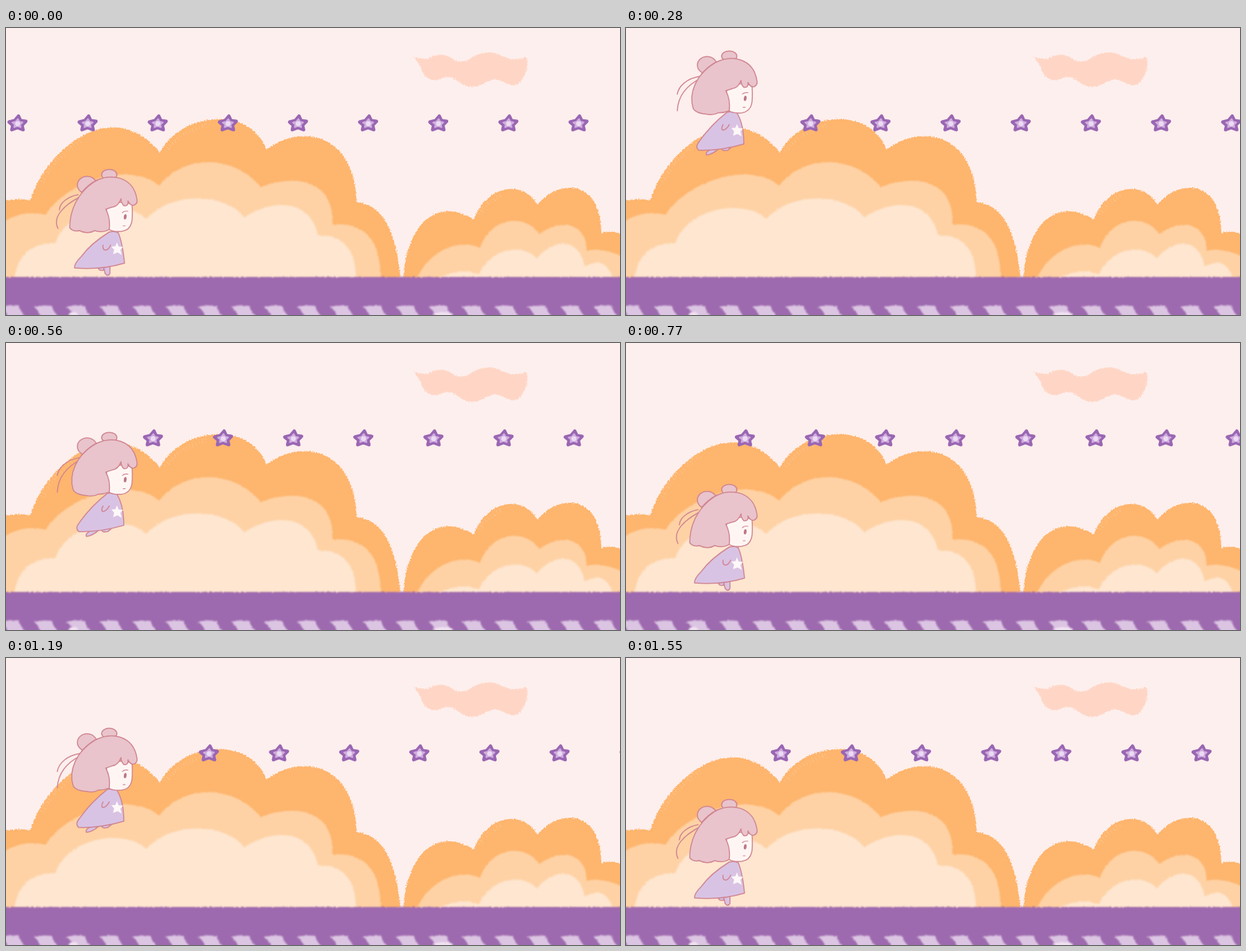
Write an HTML page that moves like this. It is 886 px wide and 415 px high and loops after 1620 ms.

```html
<!DOCTYPE html>
<html lang="en">
<head>
<meta charset="utf-8">
<title>Star jump</title>
<style>
html, body { margin: 0; width: 100%; height: 100%; overflow: hidden; background: #fdefed; }
svg { display: block; width: 100%; height: 100%; }
</style>
</head>
<body>
<svg viewBox="0 0 886 415" xmlns="http://www.w3.org/2000/svg">
  <defs>
    <filter id="chalk" x="-20" y="0" width="926" height="430" filterUnits="userSpaceOnUse" color-interpolation-filters="sRGB">
      <feTurbulence type="fractalNoise" baseFrequency=".5" numOctaves="2" seed="4"/>
      <feDisplacementMap in="SourceGraphic" scale="5" xChannelSelector="R" yChannelSelector="G"/>
      <feGaussianBlur stdDeviation=".5"/>
    </filter>
    <filter id="soft" x="-20" y="0" width="926" height="430" filterUnits="userSpaceOnUse" color-interpolation-filters="sRGB">
      <feTurbulence type="fractalNoise" baseFrequency=".3" numOctaves="2" seed="9"/>
      <feDisplacementMap in="SourceGraphic" scale="3" xChannelSelector="R" yChannelSelector="G"/>
      <feGaussianBlur stdDeviation=".9"/>
    </filter>
    <g id="star" stroke-linejoin="round">
      <path id="spike" d="M1.500 -10 L4.500 -3.500 L12 -2.500 L6.500 3 L8 9.500 L0 6.500 L-8 9.500 L-6.500 3 L-12 -1.500 L-4 -3.500Z" fill="#9a66b3" stroke="#9a66b3" stroke-width="5"/>
      <path d="M.7 -6 L3 -2 L7.500 -1 L4 2.200 L4.800 6 L0 4.200 L-4.800 6 L-4 2 L-7.500 -.8 L-2.600 -2Z" fill="#cfaede" stroke="#cfaede" stroke-width="2"/>
      <circle cx=".3" cy=".8" r="3.600" fill="#ecdaf3"/>
    </g>
  </defs>
  <rect width="886" height="415" fill="#fdefed"/>
  <path filter="url(#chalk)" fill="#ffd6c6" d="M587 41 Q602 47 612 43 Q630 33 645 45 Q658 54 673 42 Q697 29 717 41 Q733 49 751 42 Q756 56 745 74 Q736 88 722 80 Q706 70 693 78 Q672 92 655 79 Q640 66 627 74 Q611 79 602 66 Q597 50 587 41Z"/>
  <g filter="url(#chalk)" fill="#feb56d">
    <path d="M-9 251 Q18 245 35 249 C60 172 155 97 222 180 C252 122 352 111 376 176 C420 140 504 148 506 252 C548 255 565 305 569 362 H-9Z"/>
    <path d="M573 362 C581 270 630 248 675 277 C692 230 743 217 767 255 C798 218 858 218 859 296 Q880 291 895 303 V362Z"/>
    <g fill="none" stroke="#ffca96" stroke-width="7" stroke-dasharray="1 4" opacity=".55">
      <path d="M52 222 Q72 186 108 163"/>
      <path d="M230 178 Q252 150 290 140"/>
      <path d="M684 270 Q695 250 716 241"/>
    </g>
  </g>
  <g filter="url(#soft)" fill="#fed2a5">
    <path d="M-9 284 Q20 262 57 270 C85 225 175 190 221 228 C260 180 330 185 368 230 C412 212 474 216 471 284 C515 282 539 300 541 362 H-9Z"/>
    <path d="M593 362 C612 320 655 304 684 318 C700 272 750 268 770 298 C800 274 838 282 838 322 Q862 316 895 333 V362Z"/>
    <g fill="#fee6d0">
      <path d="M12 362 C18 325 40 310 71 311 C90 259 170 246 203 276 C235 238 315 236 344 274 C385 246 440 248 450 300 C485 298 505 320 505 362Z"/>
      <path d="M624 362 Q655 345 682 356 C704 315 745 312 766 333 C793 302 828 305 835 345 Q865 328 876 362Z"/>
    </g>
  </g>
  <g filter="url(#soft)">
    <rect x="-15" y="360" width="916" height="70" fill="#9e6aaf"/>
    <g id="stripes" fill="#dcc5e3"></g>
  </g>
  <g id="stars"></g>
  <g id="girl" fill="none" stroke="#d08591" stroke-width="1.500" stroke-linecap="round" stroke-linejoin="round"></g>
</svg>
<script>
const $ = id => document.getElementById(id);
const LOOP = 1620, STEP = 70, LAST = 22;

let stripes = '';
for (let x = -8; x < 890; x += 47.5)
  stripes += `<path d="M${x} 403 Q${x + 14} 400 ${x + 27} 402 Q${x + 28} 410 ${x + 37} 418 H${x + 11} Q${x + 8} 408 ${x} 403Z"/>`;
$('stripes').innerHTML = stripes +
  '<g fill="#f2e3f3"><ellipse cx="97" cy="414" rx="7" ry="3"/><ellipse cx="630" cy="414" rx="15" ry="3"/></g>';

const hair = '#e9c4cc', lilac = '#d9c3e4';
const poses = {
  stand: {
    bun: 227, left: 'Q140 297 128 293 Q118 299 106 293 Q97 295 92 289 C92 262 104 238 128 222',
    tails: 'M104 241 C88 244 77 254 77 263 M107 244 C86 255 66 272 75 290',
    dress: 'M149 295 Q156 293 162 296 Q168 310 171 340 Q138 350 99 347 Q98 341 109 330 Q122 312 149 295Z',
    arm: 'M140 314 Q139 322 145 321 Q149 319 151 314',
    feet: 'M133 347 Q135 352 141 350 L141 346Z M141 346 L143 355 Q147 360 150 355 L150 345Z'
  },
  leap: {
    bun: 225, left: 'Q141 294 133 294 Q126 298 117 296 Q101 295 97 288 C90 266 101 238 128 222',
    tails: 'M107 241 C88 244 76 255 74 267 M108 244 C88 254 75 270 74 291',
    dress: 'M146 293 Q154 291 160 294 Q170 310 170 339 Q136 349 105 348 Q99 343 106 335 Q122 312 146 293Z',
    arm: 'M140 311 Q136 319 141 319 Q146 317 149 311',
    feet: 'M120 348 Q114 352 116 355 Q125 354 134 346Z M138 346 Q139 350 147 348 L153 343Z'
  },
  float: {
    bun: 225, left: 'Q142 297 134 292 Q127 298 119 292 Q111 296 105 290 Q96 290 99 281 Q94 274 97 264 C100 246 108 235 128 222',
    tails: 'M113 238 C95 240 80 252 75 266 M116 236 C98 249 73 266 76 282',
    dress: 'M142 296 Q152 292 161 296 Q169 312 172 335 Q138 348 106 341 Q111 309 142 296Z',
    arm: 'M147 307 Q135 309 135 316 Q141 317 146 311',
    feet: 'M117 345 Q117 353 123 352 L132 347Z M143 345 Q151 348 154 355 Q160 359 159 353 L155 342Z'
  }
};

const draw = (name, p) => `<g id="${name}">
  <path d="${p.tails}"/>
  <path d="${p.feet}" fill="${lilac}"/>
  <path d="${p.dress}" fill="${lilac}"/>
  <path d="${p.arm}"/>
  <path d="M160 310 l2.500 6 6.500 .5 -4 4.500 2 7 -6 -3.500 -6.500 2.500 1.500 -6.500 -4 -4.500 6 -.5Z" fill="#fff8f8" stroke="none"/>
  <path d="M145 262 Q165 245 182 256 C183 275 184 292 167 294 Q154 295 148 291Z" fill="#fff6f4"/>
  <ellipse cx="117" cy="${p.bun}" rx="14" ry="12.500" fill="${hair}"/>
  <ellipse cx="149" cy="212" rx="11" ry="7.500" fill="${hair}"/>
  <path d="M149 291 ${p.left} C150 209 184 214 189 248 Q190 254 185 256 Q180 258 176 250 Q177 258 170 257 Q166 253 166 247 Q162 258 153 259 L144 262 Q151 275 149 291Z" fill="${hair}"/>
  <path d="M109 238 Q119 226 131 220"/>
  <ellipse cx="172" cy="273" rx="2" ry="3.800" transform="rotate(8 172 273)" fill="#bd7788" stroke="none"/>
  <path d="M168 267 Q171 264 176 265 M169 286 h3" stroke-width="1.200"/>
</g>`;
$('girl').innerHTML = Object.entries(poses).map(([k, p]) => draw(k, p)).join('');

// Step at which each collected star vanishes
const taken = { 1: 3, 2: 3, 3: 12, 4: 17 };
const COUNT = 13;
$('stars').innerHTML = '<use href="#star"/>'.repeat(COUNT);
const stars = [...$('stars').children];

// Times in steps
const jumps = [{ start: 1.44, peak: 5 }, { start: 11, peak: 14.4 }];
const HEIGHT = 186, FALL = 3.89;

function jumpAt(s) {
  for (const { start, peak } of jumps) {
    const d = s - peak;
    if (s <= start || d >= FALL) continue;
    const u = d < 0 ? d / (peak - start) : d / FALL;
    return { y: HEIGHT * (1 - u * u), pose: d > -0.1 && d < 1.4 ? 'float' : 'leap' };
  }
  return { y: 0, pose: 'stand' };
}

function render(ms) {
  const t = ms % LOOP;
  const step = t >= 1550 ? LAST : Math.min(LAST - 1, Math.floor(t / STEP));
  const shift = (step === LAST ? 1550 : step * STEP) * 0.193;
  stars.forEach((el, i) => {
    el.setAttribute('transform', `translate(${(16.5 + 101.2 * i - shift).toFixed(2)} 137.5)`);
    el.style.display = step >= taken[i] ? 'none' : '';
  });
  const { y, pose } = jumpAt(step);
  $('girl').setAttribute('transform', `translate(0 ${-y.toFixed(2)})`);
  for (const k in poses) $(k).style.display = k === pose ? '' : 'none';
}

const t0 = performance.now();
function tick() {
  render(performance.now() - t0);
  requestAnimationFrame(tick);
}
tick();
</script>
</body>
</html>
```
